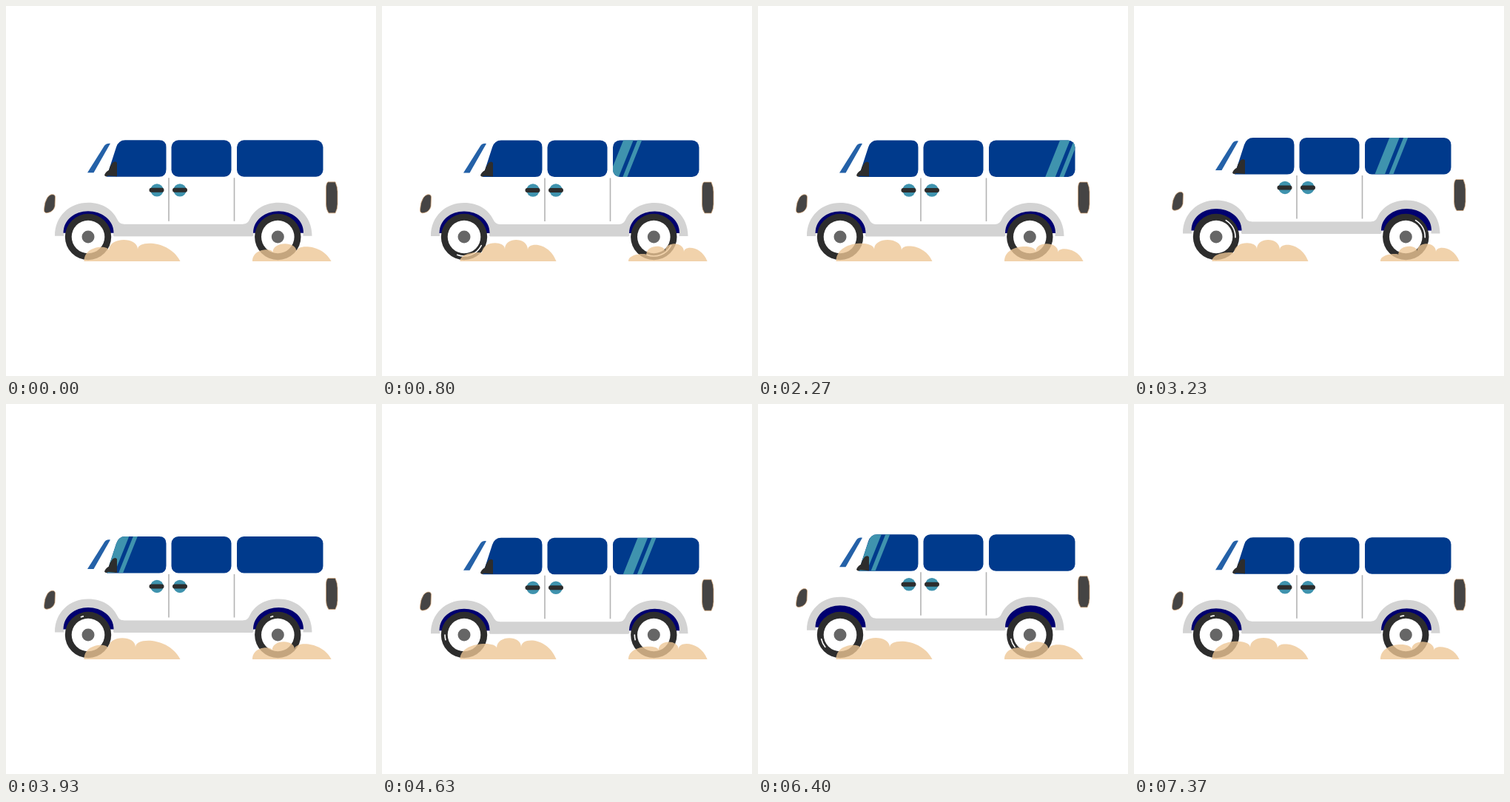
These frames come from a looping animation (500x500 px, 7430 ms). An HTML page:

```html
<!DOCTYPE html>
<html lang="en">
<head>
<meta charset="utf-8">
<title>Van on sand</title>
<style>
  html, body { margin: 0; width: 100%; height: 100%; overflow: hidden; background: #fff; }
  svg { display: block; width: 100vw; height: 100vh; }
  .glass { fill: #003a8c; }
  .trim { fill: #d3d3d3; }
  .dark { fill: #2d2d2d; }
  .lamp { fill: #454444; stroke: #d9a878; stroke-width: .7; }
  .teal { fill: #3f93ae; }
  .seam { stroke: #b3b3b3; stroke-width: 1.6; }
  .glint { fill: none; stroke: #fff; stroke-width: 1.6; stroke-linecap: round; }
  .sand { fill: rgb(238, 198, 149); fill-opacity: .79; }
</style>
</head>
<body>
<svg viewBox="0 0 500 500">
  <defs>
    <clipPath id="panes">
      <path id="front" d="M136 231 L149 191 Q152 181.500 161 181.500 H207 Q216.500 181.500 216.500 191 V221 Q216.500 231 207 231 Z"/>
      <rect id="middle" x="223.500" y="181.500" width="81" height="49.500" rx="9.500"/>
      <rect id="rear" x="312" y="181.500" width="116.500" height="49.500" rx="9.500"/>
    </clipPath>
    <g id="arch">
      <path class="trim" d="M-45 311 C-45 284 -25 266 0 266 C20 266 33 276 39 288 Q42 295 48 295 V311 Z"/>
      <path fill="#fff" d="M-33 304 H34 V312 H-33 Z"/>
      <path fill="#000070" d="M-33.500 307 C-33.500 289 -18 277.500 0 277.500 S34.500 289 34.500 307 Z"/>
    </g>
    <g id="wheel">
      <circle class="dark" r="31.200"/>
      <circle r="22.300" fill="#fff"/>
      <circle r="8.500" fill="#666"/>
    </g>
  </defs>

  <g id="body">
    <rect class="trim" x="146" y="295" width="187" height="16.500"/>
    <use href="#arch" x="111"/>
    <use href="#arch" transform="translate(368.500) scale(-1 1)"/>
    <g class="glass">
      <use href="#front"/><use href="#middle"/><use href="#rear"/>
    </g>
    <g clip-path="url(#panes)">
      <g id="shine" class="teal">
        <path d="M0 231 L20 181 H33.500 L13.500 231 Z"/>
        <path d="M19 231 L39 181 H45 L25 231 Z"/>
      </g>
    </g>
    <path fill="#2461a8" d="M110 225.500 L133 189 Q136 185 141 186 L118.500 225.500 Z"/>
    <path class="dark" d="M150 212 Q148 209 144 212 Q140 217 139 222 Q134 225 133 229 Q135 232 138 229.500 L150 230.500 Z"/>
    <path class="seam" d="M220 232.500 V291 M308.500 232.500 V291"/>
    <circle class="teal" cx="204" cy="249" r="8.700"/>
    <circle class="teal" cx="235" cy="249" r="8.700"/>
    <rect class="dark" x="193.500" y="246" width="20" height="6" rx="3"/>
    <rect class="dark" x="225" y="246" width="20" height="6" rx="3"/>
    <path class="lamp" d="M61 255 Q66 254 66.500 258 L66 271 Q64 278 57 279.500 Q51 281 51.500 275 Q52 265 56 259 Q58 256 61 255 Z"/>
    <path class="lamp" d="M435 238 H445 Q448 245 448 251 V268 Q448 274 445 280 H436 Q432.500 275 432.500 268 V247 Q432.500 240 435 238 Z"/>
  </g>

  <g transform="translate(111 312)"><use href="#wheel"/><path class="glint"/></g>
  <g transform="translate(367.300 312)"><use href="#wheel"/><path class="glint"/></g>
  <path class="sand" transform="translate(105.500 345)"/>
  <path class="sand" transform="translate(333 345) scale(.82)"/>
</svg>

<script>
const LOOP = 7430, STEP = 69.75;
const HOP = LOOP / 10, SWEEP = LOOP / 6, PUFF = LOOP / 6, TURN = LOOP / 13;
const RAD = Math.PI / 180;
const $ = q => document.querySelector(q);
const $$ = q => [...document.querySelectorAll(q)];
const body = $('#body'), shine = $('#shine');
const glints = $$('.glint'), sands = $$('.sand');
const mod = (a, n) => ((a % n) + n) % n;

// Five beats: one small hop, one big hop of two beats, two small hops
function lift(t) {
  const p = mod(t - 40, HOP * 5) / HOP;
  const big = p >= 1 && p < 3;
  return big
    ? 9.5 * Math.sin(Math.PI * (p - 1) / 2) ** 2
    : 5.3 * Math.sin(Math.PI * p) ** 2;
}

// The reflection slides in, slows at the front pane, and speeds away again
function shineX(t) {
  const p = mod(t - 1459, SWEEP * 2);
  const u = Math.min(p, SWEEP * 2 - p) / SWEEP;
  return 133 + 607 * u * u;
}

// Six drawings per puff: rows of bumps under an arched, swaying outline
function sandPath(t) {
  const width = 130;
  const step = Math.floor((t + 15) % PUFF / PUFF * 6);
  const wave = s => Math.cos(s * 60 * RAD);
  const gap = 35 + 4 * wave(step);
  const peak = 65 - 10 * wave(step - .5);
  const skew = Math.log(.5) / Math.log(peak / width);
  const top = x => 29 * Math.sin(Math.PI * (x / width) ** skew) ** .6;

  let x = 0, y = 0, d = 'M0 0';
  for (let c = step < 4 ? 14 : 33; c < 112; c += gap) {
    const last = c + gap >= 112;
    const x1 = last ? width : c + gap / 2;
    const y1 = last ? 0 : .31 * (top(c) + top(c + gap));
    const pull = (top(c) - (y + y1) / 8) / .75;
    const bend = last ? x + (x1 - x) * .75 : x1;
    d += `C${x} ${-pull} ${bend} ${-pull} ${x1} ${-y1}`;
    x = x1;
    y = y1;
  }
  return d + 'Z';
}

// A glint circles the tyre, stretching on one side and vanishing on the other
function glintPath(t) {
  const mid = 211 - 360 * t / TURN;
  const span = 45 + 45 * Math.cos((mid - 40) * RAD);
  if (span < 6) return '';
  const at = deg => [Math.cos, Math.sin].map(f => (26 * f(deg * RAD)).toFixed(2)).join(' ');
  return `M${at(mid - span / 2)}A26 26 0 0 1 ${at(mid + span / 2)}`;
}

function draw(now) {
  const i = Math.max(0, Math.floor((now % LOOP - 20) / STEP));
  const t = i ? 30 + i * STEP : 0;
  body.setAttribute('transform', `translate(0 ${-lift(t).toFixed(2)})`);
  shine.setAttribute('transform', `translate(${shineX(t).toFixed(2)} 0)`);
  const sand = sandPath(t), glint = glintPath(t);
  sands.forEach(s => s.setAttribute('d', sand));
  glints.forEach(g => g.setAttribute('d', glint));
}

let start;
function tick(now) {
  start ??= now;
  draw(now - start);
  requestAnimationFrame(tick);
}
draw(0);
requestAnimationFrame(tick);
</script>
</body>
</html>
```
